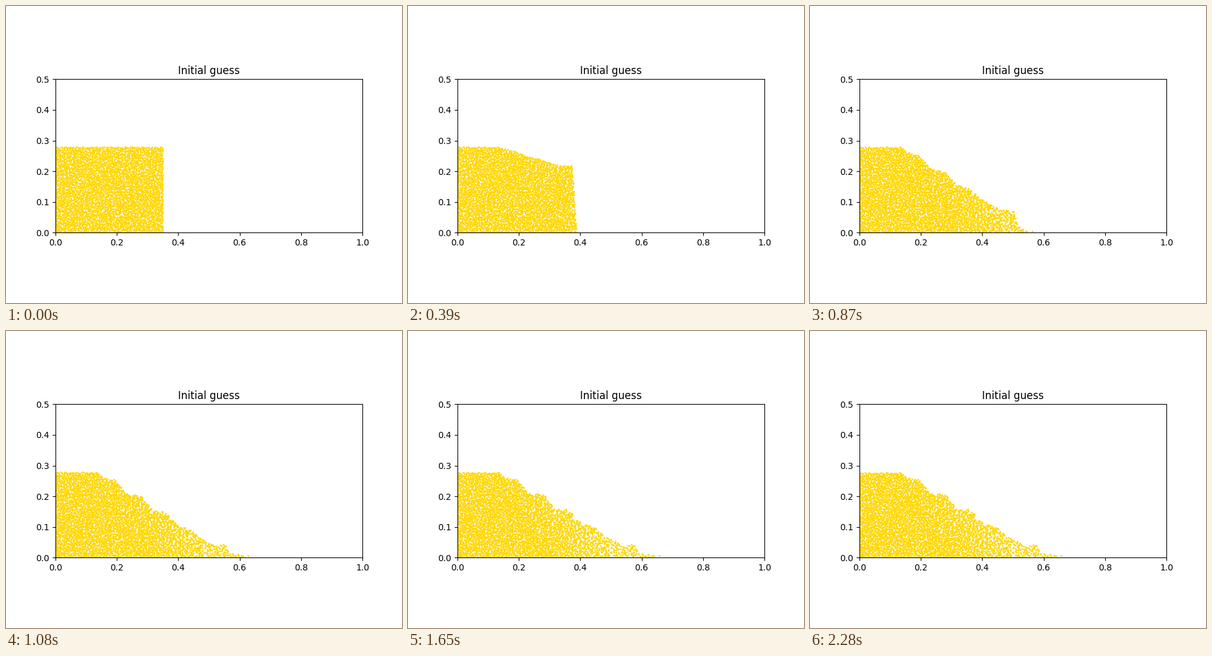
Write a matplotlib script that moves like this. It is 640x480 px and loops after 2.31 s.

```python
import numpy as np
import matplotlib.pyplot as plt
from matplotlib.animation import FuncAnimation

FRAMES, STEP = 77, 30
WIDTH, HEIGHT = 0.35, 0.28
COLS, ROWS = 76, 61
CREST = 0.137          # the pile stays at rest left of this point
CORE_FOOT = 0.322      # where the resting core meets the floor
TERRACE = 0.085        # spacing of the slumped steps


def ease(t, start, span):
    u = np.clip((t - start) / span, 0, 1)
    return u * u * (3 - 2 * u)


def surface(x, run, drop, toe):
    """Height of the pile: a sloping face, a flat block and a concave front."""
    shoulder_x = WIDTH + 0.227 * run ** 1.1
    shoulder_y = HEIGHT - 0.237 * drop
    s = np.clip((x - CREST) / (shoulder_x - 0.045 - CREST), 0, 1)
    steps = 0.028 * np.sqrt(s) * (1 - s) * np.cos(2 * np.pi * (x - 0.1915) / TERRACE)
    ripple = 0.003 * np.sin(np.pi * s) * np.sin(2 * np.pi * x / 0.023)
    slope = HEIGHT + (shoulder_y - HEIGHT) * s + run * (steps + ripple)

    v = np.clip((x - shoulder_x) / max(toe - shoulder_x, 1e-9), 0, 1)
    lip = 0.011 * run
    front = lip + (shoulder_y - lip) * (1 - v) ** (1 + 6 * run)
    return np.where(x < shoulder_x, slope, front)


def core(x):
    """Top of the resting core."""
    return HEIGHT * np.clip((CORE_FOOT - x) / (CORE_FOOT - CREST), 0, 1)


def layer(t):
    """Sliding layer: positions, surface height and share of mass to the left."""
    run, drop = ease(t, 118, 1190), ease(t, STEP, 1090)
    toe = WIDTH + 0.316 * run
    x = np.linspace(CREST, toe, 1500)
    top = surface(x, run, drop, toe)
    density = np.clip(1 - 1.7 * (x - 0.26), 0.35, 1)
    rate = np.maximum(top - core(x), 1e-6) * density
    mass = np.concatenate([[0], np.cumsum((rate[1:] + rate[:-1]) / 2)])
    return x, top, mass / mass[-1]


# One grain at a random place in every cell of a grid
rng = np.random.default_rng(7)
col, row = np.meshgrid(np.arange(COLS), np.arange(ROWS))
x0 = (col.ravel() + rng.random(col.size)) * WIDTH / COLS
y0 = (row.ravel() + rng.random(row.size)) * HEIGHT / ROWS

loose = y0 > core(x0)
base = core(x0[loose])
level = (y0[loose] - base) / (HEIGHT - base)
start_x, _, start_mass = layer(0)
share = np.interp(x0[loose], start_x, start_mass)


def grains(t):
    x, y = x0.copy(), y0.copy()
    if t > STEP:
        grid, top, mass = layer(t)
        x[loose] = np.interp(share, mass, grid)
        floor = core(x[loose])
        y[loose] = floor + level * (np.interp(x[loose], grid, top) - floor)
        y *= 1 - 0.012 * (t - STEP) / (FRAMES * STEP)   # slow settling
    return x, y


fig, ax = plt.subplots(figsize=(6.4, 4.8), dpi=100)
ax.set_aspect("equal")
ax.set_xlim(0, 1)
ax.set_ylim(0, 0.5)
ax.set_title("Initial guess")
dots, = ax.plot([], [], "o", color="gold", markersize=1)


def update(frame):
    dots.set_data(*grains(frame * STEP))
    return dots,


anim = FuncAnimation(fig, update, frames=FRAMES, interval=STEP,
                     repeat=True, repeat_delay=0)
plt.show()
```
